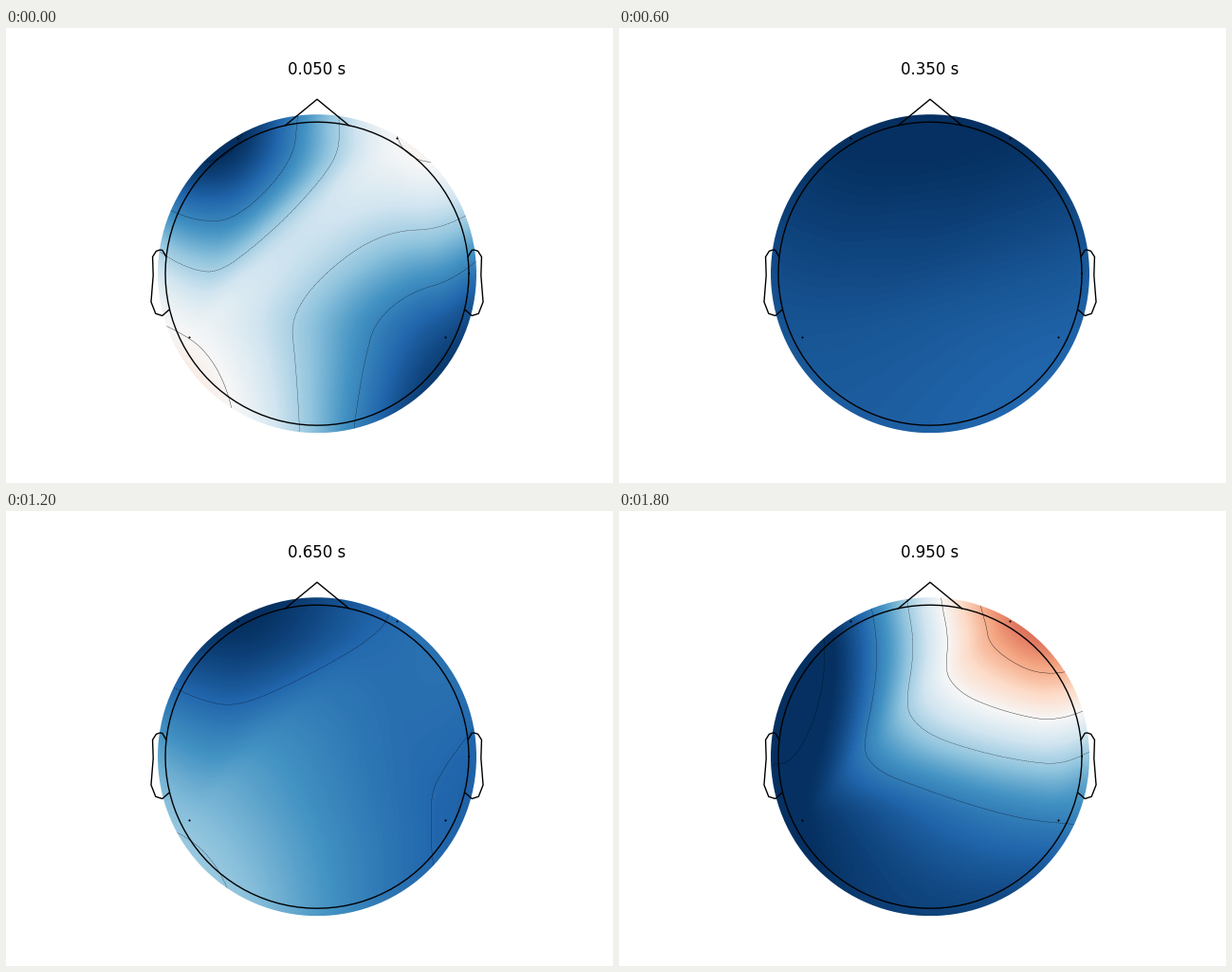
A matplotlib script for the animation above (2 s loop, 640x480 px).

```python
import numpy as np
import matplotlib.pyplot as plt
from matplotlib.animation import FuncAnimation
from matplotlib.patches import Circle
from matplotlib.tri import CubicTriInterpolator, Triangulation

# Coordinates are pixels from the head centre, y upwards.
CENTRE = (328, 259.2)
HEAD = 160
DISC = 1.05 * HEAD
RIM = 1.1 * DISC + 243
N_RIM = 12
N_FRAMES = 10
STEP = 100  # distance between contour levels

# Front and back pair. The tiny shift of the left back sensor settles
# which diagonal the triangulation uses.
SENSORS = np.array([(side * x, y) for x, y in ((84, 143), (135, -67))
                    for side in (-1, 1)], float)
SENSORS[2] *= 0.9995

# Key readings by frame: left front, right front, left back, right back.
KEYS = {
    0: (-303, -1, -1, -270),
    2: (-321, -266, -147, -192),
    3: (-270, -268, -232, -219),
    4: (-256, -125, -206, -278),
    5: (-247, -281, -140, -180),
    7: (-263, -113, -74, -226),
    9: (-252, 145, -290, -197),
}

angles = np.linspace(0, 2 * np.pi, N_RIM, endpoint=False)
points = np.vstack([SENSORS, RIM * np.c_[np.cos(angles), np.sin(angles)]])
tri = Triangulation(*points.T)
links = [(i, j) for a, b in tri.edges for i, j in ((a, b), (b, a))]
grid = np.linspace(-DISC, DISC, 64)
X, Y = np.meshgrid(grid, grid)


def readings(frame):
    """Sensor values, blended between the key readings."""
    return np.array([np.interp(frame, list(KEYS), track)
                     for track in zip(*KEYS.values())])


def with_rim(values):
    """Append rim values: the mean of the sensors each rim point touches."""
    n = len(values)
    rim = np.full(N_RIM, np.nan)
    for k in range(N_RIM):
        near = [j for i, j in links if i == n + k and j < n]
        if near:
            rim[k] = values[near].mean()
    rim[np.isnan(rim)] = np.nanmean(rim)
    return np.concatenate([values, rim])


def gradients(z):
    """Gradients that minimise the curvature along all edges."""
    n = len(z)
    A = np.zeros((n, 2, n, 2))
    b = np.zeros((n, 2))
    for i, j in links:
        e = points[j] - points[i]
        w = np.hypot(*e) ** -3
        A[i, :, i, :] += 4 * w * np.outer(e, e)
        A[i, :, j, :] += 2 * w * np.outer(e, e)
        b[i] += 6 * w * (z[j] - z[i]) * e
    return np.linalg.solve(A.reshape(2 * n, 2 * n), b.ravel()).reshape(n, 2)


def field(values):
    z = with_rim(values)
    surface = CubicTriInterpolator(tri, z, kind="user",
                                   dz=tuple(gradients(z).T))
    return np.asarray(surface(X, Y))


fig = plt.figure(figsize=(6.4, 4.8), dpi=100, facecolor="white")
ax = fig.add_axes([0, 0, 1, 1])
ax.set_axis_off()

image = ax.imshow(np.zeros_like(X), cmap="RdBu_r", origin="lower",
                  extent=(-DISC, DISC, -DISC, DISC),
                  interpolation="bilinear", aspect="auto", zorder=0)
disc = Circle((0, 0), DISC, transform=ax.transData)
image.set_clip_path(disc)


def outline(x, y):
    ax.plot(HEAD * np.asarray(x), HEAD * np.asarray(y), color="k", lw=1,
            zorder=4)


turn = np.linspace(0, 2 * np.pi, 101)
outline(np.cos(turn), np.sin(turn))

nose = np.deg2rad(12)
base = np.sqrt(1 - nose ** 2)
outline([-nose, 0, nose], [base, 1.15, base])

ear = np.array([(0.994, 0.111), (1.02, 0.155), (1.036, 0.157), (1.06, 0.149),
                (1.084, 0.111), (1.08, -0.011), (1.094, -0.186),
                (1.064, -0.263), (1.02, -0.277), (0.978, -0.24)])
for side in (-1, 1):
    outline(side * ear[:, 0], ear[:, 1])

ax.plot(*SENSORS.T, "k.", ms=3, mew=0, zorder=5)
title = ax.text(0, CENTRE[1] - 49.27, "", ha="center", va="baseline",
                fontsize=12, family="DejaVu Sans", color="k")
ax.set_xlim(-CENTRE[0], 640 - CENTRE[0])
ax.set_ylim(CENTRE[1] - 480, CENTRE[1])

contours = []


def update(frame):
    while contours:
        contours.pop().remove()
    values = readings(frame)
    peak = np.abs(values).max()
    z = field(values)
    image.set_data(z)
    image.set_clim(-peak, peak)
    levels = [k * STEP for k in range(-4, 5) if z.min() < k * STEP < z.max()]
    if levels:
        lines = ax.contour(X, Y, z, levels=levels, colors="k",
                           linewidths=0.25, zorder=2)
        lines.set_clip_path(disc)
        contours.append(lines)
    title.set_text(f"{0.05 + 0.1 * frame:.3f} s")
    return [image, title]


anim = FuncAnimation(fig, update, frames=N_FRAMES, interval=200,
                     repeat=True, repeat_delay=0, blit=False)
plt.show()
```
